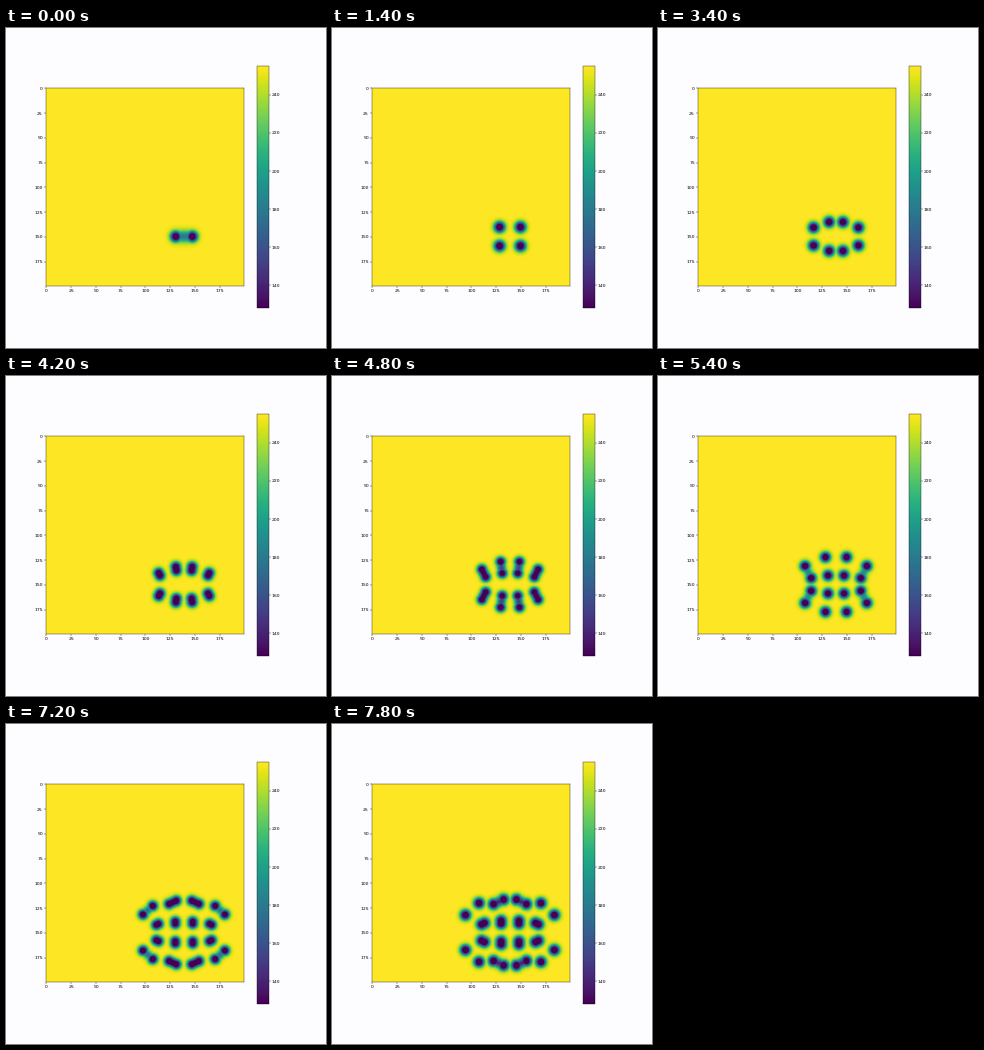
A matplotlib script that plays this animation: 320 by 320 pixels, repeating every 8 s.

```python
import numpy as np
import matplotlib.pyplot as plt
from matplotlib.animation import FuncAnimation

SIZE, N, STEP, FRAMES = 320, 200, 200, 40
LOW, HIGH = 128, 255
FIRST, CYCLE = 1400, 2200  # ms of the first and of every later division

# Spots of one quadrant after each division, as offsets from the centre in
# pixels. Neighbours 2i and 2i+1 are the two halves of spot i one row above.
GENERATIONS = [
    [8.3],
    [10.5 + 9.5j, 10.5 - 9.5j],
    [23.1 + 9.2j, 7.2 + 14.8j],
    [32.3 + 19.8j, 25.7 + 6.6j, 11.2 + 29.1j, 8.4 + 8.9j],
    [45.2 + 17.8j, 31.4 + 30j, 28.6 + 8.4j, 25.8 + 9.8j,
     16.6 + 28.6j, 6.4 + 33.2j, 9 + 12j, 9 + 9j],
]

# Folding the grid mirrors the quadrant into all four.
px = (np.arange(N) + 0.5) * 198 / N
Z = np.abs(px - 138) + 1j * np.abs(px - 148.5)[:, None]


def stroke(a, b, radius, amp):
    """Soft-edged stroke from a to b."""
    d = b - a
    k = np.real((Z - a) * np.conj(d)) / (abs(d) ** 2 + 1e-9)
    r = np.abs(Z - a - np.clip(k, 0, 1) * d)
    return amp * np.exp(-(r / radius) ** 2 / 2)


def field(t):
    if t < FIRST:
        gen, u = 0, t / FIRST
    else:
        gen, u = divmod((t - FIRST) / CYCLE, 1)
        gen = int(gen) + 1
    ease = u * u * (3 - 2 * u)
    radius = 3.5 - 0.5 * np.sin(np.pi * u)

    # The seed that the first spots grew from fades away.
    depth = stroke(-8, 8, 4.2, 0.6 * max(0, 1 - t / 600))
    ends = GENERATIONS[gen + 1]
    for i in range(0, len(ends), 2):
        parent = GENERATIONS[gen][i // 2]
        middle = parent + ((ends[i] + ends[i + 1]) / 2 - parent) * u
        half = (ends[i] - ends[i + 1]) / 2 * ease
        a, b = middle + half, middle - half
        bridge = np.clip((17 - abs(a - b)) / 10, 0, 1)
        for spot in ((a, a, 1), (b, b, 1), (a, b, bridge)):
            depth = np.maximum(depth, stroke(*spot[:2], radius, 1.5 * spot[2]))
    return HIGH - (HIGH - LOW) * np.clip(depth, 0, 1)


def axes(x, y, w, h):
    return fig.add_axes([x / SIZE, y / SIZE, w / SIZE, h / SIZE])


fig = plt.figure(figsize=(10, 10), dpi=32, facecolor="#fdfcff")
ax = axes(40, 62, 198, 198)
image = ax.imshow(field(0), cmap="viridis", vmin=LOW, vmax=HIGH)
ax.set_xticks(range(0, N, 25))
ax.set_yticks(range(0, N, 25))
fig.colorbar(image, cax=axes(250.8, 40, 12, 241.6), ticks=range(140, 241, 20))


def update(i):
    image.set_data(field(i * STEP))
    return [image]


anim = FuncAnimation(fig, update, frames=FRAMES, interval=STEP, repeat=True)
plt.show()
```
